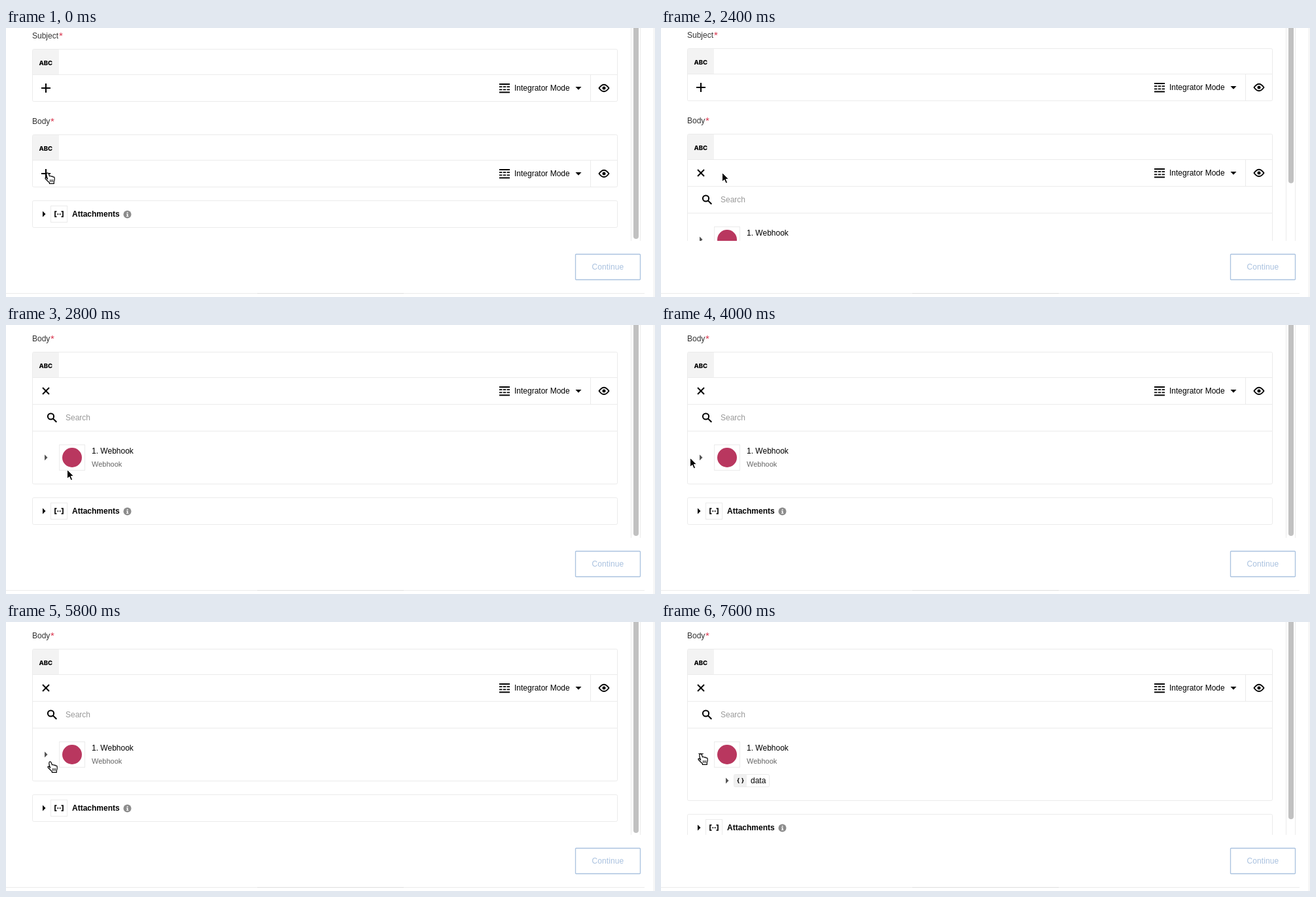
Write an HTML page that moves like this. It is 992 px wide and 412 px high and loops after 8000 ms.

```html
<!DOCTYPE html>
<html lang="en">
<head>
<meta charset="utf-8">
<title>Body field picker</title>
<style>
html, body { margin: 0; width: 100%; height: 100%; overflow: hidden; background: #fff; }
svg { display: block; width: 992px; height: 412px; font: 12px "Liberation Sans", Arial, sans-serif; }
.line { fill: none; stroke: #ebebeb; }
.ink { fill: none; stroke: #000; stroke-width: 2; }
.label { fill: #333; }
.abc { font: 800 9.5px Inter, sans-serif; }
.star { fill: #d9364f; font-size: 15px; }
</style>
</head>
<body>
<svg viewBox="0 0 992 412">
  <defs>
    <clipPath id="view"><rect width="992" height="326"/></clipPath>
    <g id="field">
      <path d="M41 1h40v38h-40z" fill="#f3f3f3"/>
      <text class="abc" x="50.5" y="24.5">ABC</text>
      <path class="line" d="M41 39.5H934M893.5 40V80"/>
      <g class="ink">
        <path d="M754 54h16M754 66.500h16" stroke-width="1.800"/>
        <path d="M754 58.200h16M754 62.400h16" stroke-width="1.800" stroke-dasharray="4.400 1.400"/>
        <path d="M906.500 60Q914 49.500 921.500 60Q914 70.500 906.500 60z" stroke-width="1.800"/>
      </g>
      <circle cx="914" cy="60" r="2.500"/>
      <text x="777" y="64">Integrator Mode</text>
      <path d="M870.500 58h9l-4.500 4.700z"/>
    </g>
    <path id="plus" class="ink" d="M-7 0H7M0-7V7"/>
    <path id="tri" d="M-2-4.500L2.500 0L-2 4.500z"/>
  </defs>

  <g clip-path="url(#view)">
    <g id="page">
      <text class="label" x="40" y="16">Subject</text>
      <text class="star" x="81" y="17">*</text>
      <rect class="line" x="40.500" y="32.500" width="894" height="80" rx="2"/>
      <use href="#field" y="32"/>
      <use href="#plus" x="61" y="92"/>

      <text class="label" x="40" y="147">Body</text>
      <text class="star" x="68" y="148">*</text>
      <rect id="body" class="line" x="40.500" y="163.500" width="894" height="80" rx="2"/>
      <use href="#field" y="163"/>
      <g id="toggle"><use href="#plus"/></g>

      <g id="picker">
        <path class="line" d="M41 243.500H934M41 284.500H934"/>
        <circle class="ink" cx="68.500" cy="262" r="4.600"/>
        <path class="ink" d="M72 265.500l5.300 5.300"/>
        <text x="91" y="268" fill="#999">Search</text>
        <g id="arrow" fill="#555"><use href="#tri"/></g>
        <rect class="line" x="81.500" y="305.500" width="39" height="39"/>
        <circle cx="101" cy="325" r="15" fill="#b9375f"/>
        <text x="131" y="319">1. Webhook</text>
        <text x="131" y="338.500" font-size="11" fill="#666">Webhook</text>
        <g id="data">
          <use href="#tri" x="101" y="365" fill="#555"/>
          <path d="M112 356h19v18h-19z" fill="#f0f0f0"/>
          <rect class="line" x="111.500" y="355.500" width="54" height="19" rx="2"/>
          <path class="ink" d="M119.500 361.500q-1.500 0-1.300 1.700q0 1.500-1.400 1.800q1.400.300 1.400 1.800q-.200 1.700 1.300 1.700M123.500 361.500q1.500 0 1.300 1.700q0 1.500 1.400 1.800q-1.400.300-1.400 1.800q.200 1.700-1.300 1.700" style="stroke-width:1.300"/>
          <text x="137" y="369">data</text>
        </g>
      </g>

      <g id="files">
        <rect class="line" x="40.500" y="264.500" width="894" height="41" rx="2"/>
        <use href="#tri" x="58" y="285"/>
        <rect class="line" x="68.500" y="272.500" width="25" height="25"/>
        <path class="ink" d="M77.500 281H75v8h2.500M84.500 281H87v8h-2.500" style="stroke-width:1.700"/>
        <path d="M78.500 284.200h1.700v1.700h-1.700zM81.800 284.200h1.700v1.700h-1.700z"/>
        <text x="101" y="289" font-weight="bold">Attachments</text>
        <circle cx="185.500" cy="285.500" r="6" fill="#8c8c8c"/>
        <path d="M184.700 282h1.800v1.500h-1.800zM184 284.500h2.500v3.500h.800v1h-3.300v-1h.800v-2.500h-.800z" fill="#fff"/>
      </g>
    </g>
    <path class="line" d="M955.500 0V326M969.500 0V326"/>
    <rect id="thumb" x="959" y="-20" width="8" rx="4" fill="#c1c1c1"/>
  </g>

  <path class="line" d="M990.500 0V412M0 406.500H976"/>
  <path class="line" d="M384 406.500H608" style="stroke:#dedede"/>
  <rect x="870.500" y="346.500" width="99" height="39" rx="1" fill="#fff" stroke="#a9c1df" stroke-width="1.300"/>
  <text x="895.500" y="370" fill="#a9c1df" letter-spacing=".1">Continue</text>

  <circle id="ripple" cx="60.500" cy="201" r="32" fill="#000" opacity=".07"/>
  <g id="hand" stroke="#000" stroke-linejoin="round" stroke-linecap="round">
    <path d="M4.600 10.500L3 5.500Q2.300 1 4.300.800Q5.800.700 6.500 3L7.500 6Q9.300 4.800 10.300 6.500Q12 5.500 12.800 7.200Q15 6.500 15.200 9Q15.500 12 14.300 14.500V17.300H7.300V15.800Q4.500 13.500 1.300 10Q.400 8.300 2 8.100Q3.300 8.200 4.600 10.500z" fill="#fff" stroke-width="1.200"/>
    <path d="M8.500 11.500v3M10.500 11.500v3M12.500 11.500v3" fill="none" stroke-width=".9"/>
  </g>
  <path id="pointer" d="M.5.500V14.500L3.800 11.500L6.200 16.800L8.600 15.700L6.300 10.600H10.500z" stroke="#fff" stroke-width="1"/>
</svg>
<script>
const LOOP = 8000;
const $ = id => document.getElementById(id);
const show = (el, on) => el.setAttribute("display", on ? "inline" : "none");
const move = (el, x, y, turn = 0) => el.setAttribute("transform", `translate(${x} ${y}) rotate(${turn})`);

// [time, left, top, shape]
const cursor = [
  [0, 59, 221, "hand"], [800, 59, 219, "hand"], [2000, 83, 223, "pointer"],
  [2200, 88, 223, "pointer"], [2400, 93, 221, "pointer"], [3600, 86, 221, "hand"],
  [3800, 23, 204, "pointer"], [4000, 44, 203, "pointer"], [4200, 118, 198, "hand"],
  [4400, 126, 197, "hand"], [4600, 127, 197, "hand"], [5000, 194, 198, "hand"],
  [5400, 152, 198, "hand"], [5800, 63, 213, "hand"], [6000, 64, 207, "hand"],
  [6200, 50, 203, "hand"], [6600, 55, 200, "hand"], [7200, 56, 199, "hand"],
  [7600, 56, 201, "hand"]
];
const scroll = [[0, 0], [2400, 1], [2600, 111], [2800, 122]];
const at = (steps, t) => steps.filter(s => s[0] <= t).pop();

function draw(t) {
  const open = t >= 1600, wide = t >= 7200;
  const grow = open ? (wide ? 152 : 122) : 0;
  const top = at(scroll, t)[1];

  move($("page"), 0, -top);
  $("body").setAttribute("height", 80 + grow);
  move($("files"), 0, grow);
  move($("toggle"), 61, 223, open ? 45 : 0);
  move($("arrow"), 61, 325, wide ? 90 : 0);
  show($("picker"), open);
  show($("data"), wide);

  const end = wide ? 302 : open ? 237 + top * 86 / 122 : 323;
  $("thumb").setAttribute("height", end + 20);

  show($("ripple"), t >= 6800 && t < 7000);
  const [, x, y, shape] = at(cursor, t);
  for (const id of ["hand", "pointer"]) {
    show($(id), id === shape);
    move($(id), x, y);
  }
}

function tick() {
  draw(performance.now() % LOOP);
  requestAnimationFrame(tick);
}
tick();
</script>
</body>
</html>
```
